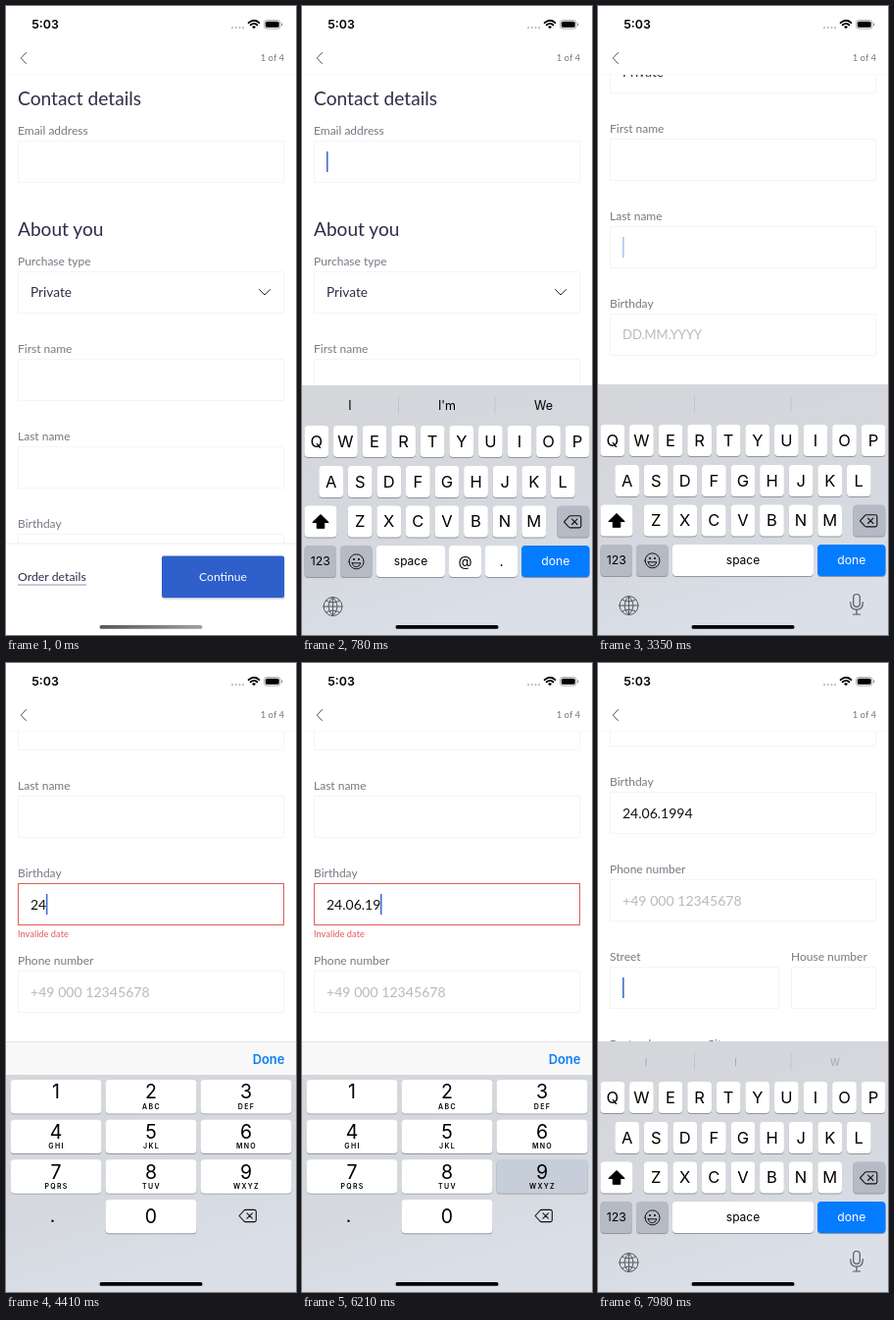
An HTML page that plays this animation: 296x640 px, repeating every 8 s.

```html
<!DOCTYPE html>
<html lang="en">
<head>
<meta charset="utf-8">
<title>Checkout form</title>
<style>
  html, body { margin: 0; width: 100%; height: 100%; overflow: hidden; background: #fff; }
  svg { display: block; width: 296px; height: 640px; }
  text { font-family: Lato, "Open Sans", sans-serif; white-space: pre; }
  .ui { font-family: Inter, Roboto, sans-serif; }
  .line { fill: none; stroke-linecap: round; stroke-linejoin: round; }
</style>
</head>
<body>
<svg id="stage" viewBox="0 0 296 640" xmlns="http://www.w3.org/2000/svg"></svg>
<script>
const LOOP = 8000;
const INK = '#2d2e48', MUTED = '#777883', HINT = '#b9b9c0', RED = '#e35b5b', BLUE = '#2e5fca';
const BORDER = '#f5f5f6', KEY_GREY = '#b6bac4', ACTION = '#047cff', KEYBOARD_Y = 385;

// Text is placed by its vertical centre.
const text = (x, y, size, str, fill, attrs = '') =>
  `<text x="${x}" y="${(y + size * .36).toFixed(2)}" font-size="${size}" fill="${fill}" ${attrs}>${str}</text>`;
const ui = (x, y, size, str, attrs = '', fill = '#000') =>
  text(x, y, size, str, fill, `class="ui" text-anchor="middle" ${attrs}`);
const rect = (x, y, w, h, fill, attrs = '') =>
  `<rect x="${x}" y="${y}" width="${w}" height="${h}" fill="${fill}" ${attrs}/>`;
const line = (d, stroke, width = 1, attrs = '') =>
  `<path class="line" d="${d}" stroke="${stroke}" stroke-width="${width}" ${attrs}/>`;
const group = (id, body, attrs = '') => `<g id="${id}" ${attrs}>${body}</g>`;

// ---- Form -------------------------------------------------------------
const LABELS = { email: 126, first: 348, last: 437, birthday: 526, phone: 615, street: 704 };

function field(label, y, x = 12, w = 272, id = '') {
  return text(x, y + .3, 12, label, MUTED) +
    rect(x + .5, y + 11.5, w - 1, 42, '#fff', `stroke="${BORDER}" ${id && `id="${id}"`}`);
}

function form() {
  return text(12, 94, 19.2, 'Contact details', INK) +
    field('Email address', LABELS.email) +
    text(12, 227, 19.1, 'About you', INK) +
    field('Purchase type', 259) +
    text(25, 291, 13.7, 'Private', INK) +
    line('M258.5 288.5 264 294 269.5 288.5', INK) +
    field('First name', LABELS.first) +
    field('Last name', LABELS.last) +
    field('Birthday', LABELS.birthday, 12, 272, 'birthBox') +
    text(25, 558.5, 13, 'DD.MM.YYYY', HINT, 'id="birthHint"') +
    text(25, 558.5, 14, '', '#111', 'id="birthText"') +
    text(12, 589, 9.3, 'Invalide date', RED, 'id="error"') +
    field('Phone number', LABELS.phone) +
    text(25, 647.5, 14.1, '+49 000 12345678', HINT) +
    field('Street', LABELS.street, 12, 173) +
    field('House number', LABELS.street, 197, 87) +
    field('Postcode', 793, 12, 87) +
    field('City', 793, 111, 173) +
    rect(25, 0, 1.6, 21, '#3f6dd2', 'id="caret"');
}

function header() {
  const dots = [231, 234.7, 238.4, 242].map(x => `<circle cx="${x}" cy="22" r="1" fill="#b5b5b5"/>`).join('');
  return rect(0, 0, 296, 69, '#fff') + rect(0, 69, 296, 1, '#f9f9f9') +
    ui(40, 18.7, 12.4, '5:03', 'font-weight="600"') + dots +
    line('M247.6 17.1Q253 12.3 258.4 17.1M249.7 19.3Q253 16.5 256.3 19.3', '#000', 1.8) +
    '<path d="M251 21.1Q253 19.4 255 21.1L253 23.3Z"/>' +
    rect(263.5, 14.5, 16.5, 8.6, 'none', 'rx="2.6" stroke="#999" stroke-width=".8"') +
    rect(264.8, 15.8, 13.9, 6, '#000', 'rx="1.5"') + rect(281, 17.3, 1.2, 3, '#999', 'rx=".6"') +
    line('M20.5 47.5 15.3 53 20.5 58.5', '#55566a') +
    text(284, 52.5, 9.5, '1 of 4', MUTED, 'text-anchor="end"');
}

function footer() {
  return rect(0, 547, 296, 93, '#fff') + rect(0, 546.5, 296, 1, '#eeeef0') +
    text(12, 581, 12.3, 'Order details', INK) + rect(12, 588.5, 70, 1, '#8b95b5') +
    rect(159.5, 561, 125, 42.5, '#c9cfdd', 'rx="2"') +
    rect(159, 559.5, 125, 42.5, BLUE, 'rx="2"') +
    text(221.5, 581, 12.1, 'Continue', '#fff', 'text-anchor="middle"');
}

// ---- Keyboards, drawn from their own top edge ---------------------------
const ROWS = [41, 82, 122.5, 163];

function key(x, y, w, label = '', size = 16.5, fill = '#fff', color = '#000', h = 32, id = '') {
  return rect(x, y + .9, w, h, '#94969c', 'rx="4"') +
    rect(x, y, w, h, fill, `rx="4" ${id && `id="${id}"`}`) +
    (label && ui(x + w / 2, y + h / 2 - .2, size, label, id && `id="${id}Label"`, color));
}

const deleteIcon = (x, y) => line(
  `M${x - 9} ${y}l5-5.5q.6-.6 1.5-.6h9q1.8 0 1.8 1.8v8.6q0 1.8-1.8 1.8h-9q-.9 0-1.5-.6zM${x - 1} ${y - 2.7}l5.4 5.4m0-5.4l-5.4 5.4`,
  '#111', 1.1);

function letters() {
  const [top, home, low, bottom] = ROWS;
  const row = (chars, x, y) => [...chars].map((c, i) => key(x + i * 29.58, y, 24.7, c)).join('');
  const smile = line('M48 179.3a7.5 7.5 0 1 0 15 0a7.5 7.5 0 1 0-15 0zM51.2 180.8h8.6q-.7 3.8-4.3 3.8t-4.3-3.8z', '#111') +
    '<circle cx="53" cy="177" r="1"/><circle cx="58" cy="177" r="1"/>';
  const globe = line('M22 225a9.5 9.5 0 1 0 19 0a9.5 9.5 0 1 0-19 0zM31.5 215.5v19M22 225h19' +
    'M31.5 215.5q-9.4 9.5 0 19M31.5 215.5q9.4 9.5 0 19M24.5 219q7 4 14 0M24.5 231q7-4 14 0', '#555a61', 1);
  const mic = line('M264 213.5q3.3 0 3.3 3.3v6.2q0 3.3-3.3 3.3t-3.3-3.3v-6.2q0-3.3 3.3-3.3z' +
    'M257.8 221.5v1.5q0 6.2 6.2 6.2t6.2-6.2v-1.5M264 229.5v4.5M260.5 234h7', '#555a61', 1.2);
  return rect(98, 11, 1, 18, '#c2c5cb') + rect(196.5, 11, 1, 18, '#c2c5cb') +
    group('words', ui(49, 20.5, 12.5, 'I') + ui(148, 20.5, 12.5, "I'm") + ui(246.5, 20.5, 12.5, 'We')) +
    group('wordsPart', ui(49, 21, 10, 'I', '', '#a3a6ad') + ui(140.5, 21, 10, 'I', '', '#a3a6ad') +
      ui(242, 21, 10, 'W', '', '#a3a6ad')) +
    row('QWERTYUIOP', 2.5, top) + row('ASDFGHJKL', 17.3, home) + row('ZXCVBNM', 46.8, low) +
    key(2.5, low, 33) +
    '<path d="M19 131.5l8.2 8h-4.4v5.8h-7.6v-5.8h-4.4z" stroke="#000" stroke-linejoin="round"/>' +
    key(260.3, low, 33, '', 0, KEY_GREY) + deleteIcon(276.5, 138.8) +
    key(2.5, bottom, 32.5, '123', 12.3, KEY_GREY) +
    key(39, bottom, 32.5, '', 0, KEY_GREY) + smile +
    group('emailRow', key(76, bottom, 70, 'space', 12) + key(150, bottom, 33, '@', 14.5) + key(187, bottom, 33, '.', 14.5)) +
    group('plainRow', key(76, bottom, 144, 'space', 12) + mic) +
    key(224, bottom, 69.5, 'done', 12.2, ACTION, '#fff', 32, 'done') + globe;
}

function numbers() {
  const subs = ['', 'ABC', 'DEF', 'GHI', 'JKL', 'MNO', 'PQRS', 'TUV', 'WXYZ'];
  const rowY = i => 39 + i * 40.65;
  const blank = (x, y, n) => key(x, y, 93, '', 0, '#fff', '', 34.4, 'key' + n);
  const pad = subs.map((sub, i) => {
    const x = 4.5 + i % 3 * 97, y = rowY(Math.floor(i / 3));
    return blank(x, y, i + 1) + ui(x + 46.5, y + 12.3, 19.5, i + 1) +
      ui(x + 47, y + 27, 7, sub, 'font-weight="600" letter-spacing="1.3"');
  }).join('');
  return rect(0, 0, 296, 34, '#f8f8f9') + rect(0, 0, 296, 1, '#e4e4e6') +
    ui(268, 18, 12.9, 'Done', 'font-weight="600"', '#0a7cf5') + pad +
    blank(101.5, rowY(3), 0) + ui(148, 178, 19.5, '0') +
    ui(47.5, 177, 19, '.', 'id="dotKey"') + ui(47.5, 177.5, 13, '+ ∗ #', 'id="symbolKey"') +
    deleteIcon(247, 177.5);
}

document.getElementById('stage').innerHTML =
  `<defs>
    <linearGradient id="tray" x2=".35" y2="1"><stop stop-color="#d4d6da"/><stop offset=".65" stop-color="#d5d8de"/><stop offset="1" stop-color="#dadfe8"/></linearGradient>
    <linearGradient id="bar"><stop stop-color="#555"/><stop offset="1" stop-color="#a0a0a0"/></linearGradient>
  </defs>` +
  rect(0, 0, 296, 640, '#fff') + group('form', form()) + header() + footer() +
  group('keyboard', rect(0, 0, 296, 256, 'url(#tray)') + group('letters', letters()) + group('numbers', numbers())) +
  rect(95.5, 630, 105, 3.8, '#000', 'rx="1.9" id="homeBar"');

// ---- Timeline -----------------------------------------------------------
const FOCUS = [[500, 'email'], [1810, 'first'], [2690, 'last'], [3460, 'birthday'], [7110, 'phone'], [7830, 'street']];
const SCROLLS = [[1800, 2210, 135], [2680, 2950, 224], [3440, 3670, 313], [7080, 7430, 402], [7810, 7960, 406]];
// key, pressed at, released at, text after release
const TAPS = [
  [2, 3990, 4070, '2'], [4, 4310, 4410, '24'], [0, 4710, 4810, '24.0'], [6, 5110, 5530, '24.06'],
  [1, 5530, 5620, '24.06.1'], [9, 5940, 6040, '24.06.19'], [9, 6210, 6330, '24.06.199'], [4, 6610, 6680, '24.06.1994']
];

const $ = Object.fromEntries([...document.querySelectorAll('[id]')].map(el => [el.id, el]));
const set = (el, name, value) => el.setAttribute(name, value);
const show = (el, on) => set(el, 'display', on ? 'inline' : 'none');
const within = (t, from, to) => t >= from && t < to;
const ease = p => p * p * (3 - 2 * p);

function scrollAt(t) {
  let pos = 0;
  for (const [from, to, target] of SCROLLS)
    if (t > from) pos += (target - pos) * ease(Math.min(1, (t - from) / (to - from)));
  return pos;
}

function keyboardShift(t) {
  const x = Math.max(0, t - 475) * .025;
  return t < 500 ? 260 : 255 * (1 + x) * Math.exp(-x);
}

function caretOpacity(t) {
  if (within(t, 1090, 1160) || within(t, 3350, 3460)) return .4;
  return t < 500 || within(t, 1160, 1570) ? 0 : 1;
}

function render(t) {
  set($.form, 'transform', `translate(0 ${-scrollAt(t).toFixed(2)})`);
  set($.keyboard, 'transform', `translate(0 ${Math.round(KEYBOARD_Y + keyboardShift(t))})`);
  set($.homeBar, 'fill', t < 570 ? 'url(#bar)' : '#000');

  const isEmail = t < 1850, isNumeric = within(t, 3460, 7830);
  show($.letters, !isNumeric);
  show($.numbers, isNumeric);
  show($.emailRow, isEmail);
  show($.plainRow, !isEmail);
  show($.words, isEmail);
  show($.wordsPart, t >= 7980);
  show($.dotKey, t < 7110);
  show($.symbolKey, t >= 7110);

  const donePressed = within(t, 1730, 1810) || within(t, 2620, 2690);
  set($.done, 'fill', donePressed ? '#fff' : ACTION);
  set($.doneLabel, 'fill', donePressed ? '#000' : '#fff');

  let typed = '';
  for (let n = 0; n < 10; n++) set($['key' + n], 'fill', '#fff');
  for (const [n, down, up, result] of TAPS) {
    if (within(t, down, up)) set($['key' + n], 'fill', '#c6ced9');
    if (t >= up) typed = result;
  }
  $.birthText.textContent = typed;
  show($.birthHint, !typed);
  const invalid = within(t, 4410, 7040);
  set($.birthBox, 'stroke', invalid ? RED : BORDER);
  show($.error, invalid);

  const focus = FOCUS.filter(([at]) => t >= at).pop();
  const name = focus ? focus[1] : 'email';
  const offset = name === 'birthday' && typed ? $.birthText.getComputedTextLength() - .4 : 0;
  set($.caret, 'x', 25 + offset);
  set($.caret, 'y', LABELS[name] + 22);
  set($.caret, 'opacity', caretOpacity(t));
}

const start = performance.now();
function tick() {
  render((performance.now() - start) % LOOP);
  requestAnimationFrame(tick);
}
tick();
</script>
</body>
</html>
```
